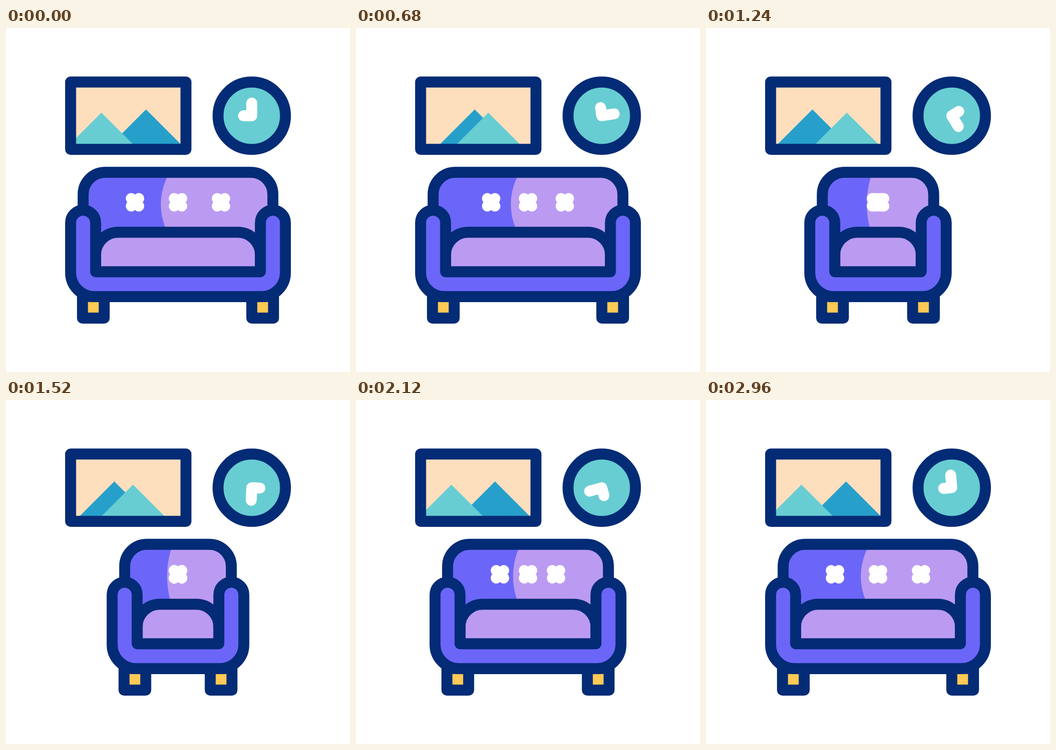
An HTML page with a canvas that plays this animation: 640 px wide and 640 px high, repeating every 3 s.

```html
<!DOCTYPE html>
<html lang="en">
<head>
<meta charset="utf-8">
<title>Living room</title>
<style>
  html, body { margin: 0; width: 100%; height: 100%; overflow: hidden; background: #fff; }
  canvas { display: block; }
</style>
</head>
<body>
<canvas id="stage" width="640" height="640"></canvas>
<script>
const ctx = document.getElementById('stage').getContext('2d');
const LOOP = 3000, STEP = 40;
const NAVY = '#042b75', PURPLE = '#6b66f8', LILAC = '#bb9af2', TEAL = '#67cdd2',
      BLUE = '#26a0cb', PEACH = '#fddfbe', YELLOW = '#ffca55', WHITE = '#fff';

// Cubic bezier easing with handles (.33, 0) and (x2, 1)
function ease(u, x2) {
  if (u <= 0) return 0;
  if (u >= 1) return 1;
  let lo = 0, hi = 1;
  for (let i = 0; i < 24; i++) {
    const s = (lo + hi) / 2, r = 1 - s;
    if (3 * r * r * s * 0.33 + 3 * r * s * s * x2 + s * s * s < u) lo = s; else hi = s;
  }
  return lo * lo * (3 - 2 * lo);
}

// Progress of a move that begins at start and lasts dur
const move = (t, start, dur, x2) => ease((t - start) / dur, x2);

function paint(path, fill, line = NAVY) {
  if (fill) { ctx.fillStyle = fill; ctx.fill(path); }
  if (line) { ctx.strokeStyle = line; ctx.stroke(path); }
}

function box(x, y, w, h) {
  const p = new Path2D();
  p.rect(x, y, w, h);
  return p;
}

function mountain(x, top, color) {
  const h = 240 - top;
  paint(new Path2D(`M${x} ${top} l${h} ${h} h${-2 * h} z`), color, null);
}

function drawPicture(t) {
  const swap = (out, back) => move(t, out, 865, 0.37) - move(t, back, 865, 0.37);
  const frame = box(120.2, 100.5, 214.6, 125.3);
  paint(frame, PEACH, null);
  ctx.save();
  ctx.clip(frame);
  mountain(260.5 - 62.5 * swap(280, 1410), 151.5, BLUE);
  mountain(177.5 + 84.5 * swap(167, 1270), 157.5, TEAL);
  ctx.restore();
  paint(frame);
}

function drawClock(t) {
  const face = new Path2D();
  face.arc(0, 0, 62.7, 0, 7);
  ctx.save();
  ctx.translate(457.2, 163.2);
  paint(face, TEAL);
  ctx.rotate(t / LOOP * 2 * Math.PI);
  paint(new Path2D('M0 -23.5 V0 H-15.3'), null, WHITE);
  ctx.restore();
}

// w is half the sofa's outer width, gap the distance between tufts
function drawSofa(w, gap) {
  ctx.save();
  ctx.translate(320, 0);

  for (const side of [-1, 1]) {
    paint(box(side * (w - 52.5) - 20.2, 499.5, 40.4, 40.2), YELLOW);
  }

  const k = w - 33.5;
  const back = new Path2D();
  back.moveTo(-k, 400);
  back.arcTo(-k, 268.5, 0, 268.5, 41);
  back.arcTo(k, 268.5, k, 400, 41);
  back.lineTo(k, 400);
  paint(back, PURPLE, null);
  ctx.save();
  ctx.clip(back);
  const s = w / 210;
  const light = new Path2D();
  light.ellipse(82 * s, 328, 114 * s, 114, 0, Math.PI / 2, Math.PI * 1.5);
  light.lineTo(w, 214);
  light.lineTo(w, 442);
  paint(light, LILAC, null);
  ctx.restore();
  paint(back);

  for (const x of [-gap, 0, gap]) {
    paint(new Path2D(`M${x - 7} 317.2 l14 14 m0 -14 l-14 14`), null, WHITE);
  }

  const a = w - 10.2, b = w - 56.7, mid = (a + b) / 2, r = (a - b) / 2;
  const seat = new Path2D();
  seat.moveTo(-b, 453.5);
  seat.arcTo(-b, 380, 0, 380, 42);
  seat.arcTo(b, 380, b, 453.5, 42);
  seat.lineTo(b, 453.5);
  paint(seat, LILAC);

  const arms = new Path2D();
  arms.moveTo(-b, 453.5);
  arms.arc(-mid, 362.2, r, 0, Math.PI, true);
  arms.arcTo(-a, 499.7, 0, 499.7, 44.5);
  arms.arcTo(a, 499.7, a, 362, 44.5);
  arms.arc(mid, 362.2, r, 0, Math.PI, true);
  arms.lineTo(b, 453.5);
  arms.closePath();
  paint(arms, PURPLE);
  ctx.restore();
}

function draw(t) {
  ctx.fillStyle = WHITE;
  ctx.fillRect(0, 0, 640, 640);
  ctx.lineWidth = 20.4;
  ctx.lineJoin = ctx.lineCap = 'round';
  drawPicture(t);
  drawClock(t);

  const stretch = move(t, 0, 500, 0.2);
  const shrink = move(t, 500, 1020, 0.2);
  const grow = move(t, 1720, 1000, 0.2);
  drawSofa(210 + 13 * stretch - 90.3 * shrink + 77.3 * grow, 80 * (1 - shrink + grow));
}

const begin = performance.now();
function tick() {
  const t = (performance.now() - begin) % LOOP;
  draw(Math.floor(t / STEP) * STEP);
  requestAnimationFrame(tick);
}
tick();
</script>
</body>
</html>
```
